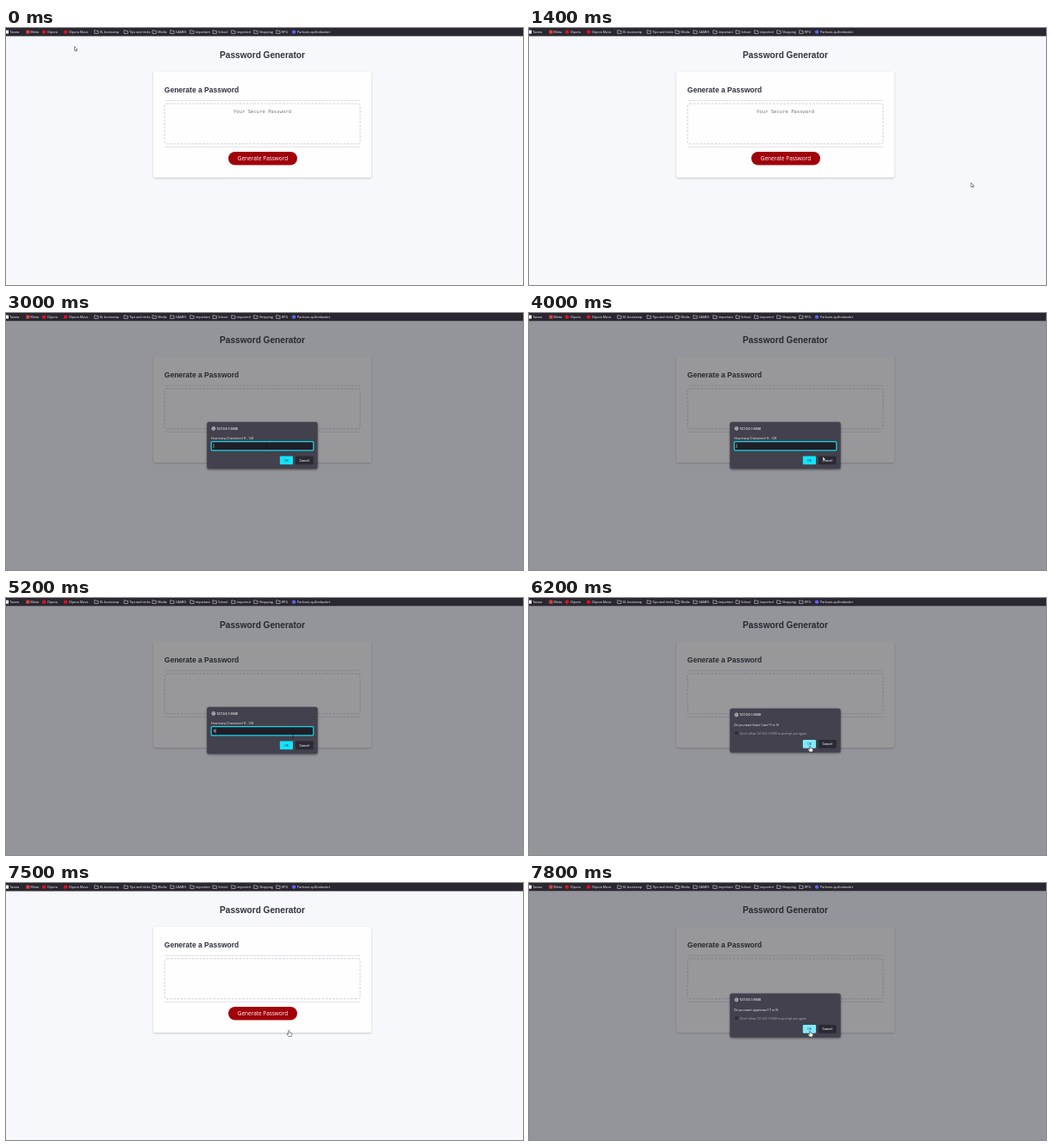
An HTML page for the animation above (8 s loop, 600 px wide and 299 px high).

```html
<!DOCTYPE html>
<html lang="en">
<head>
<meta charset="utf-8">
<title>Password Generator</title>
<style>
  html, body { margin: 0; width: 100%; height: 100%; overflow: hidden; background: #f7f8fc; }
  svg { display: block; width: 600px; height: 299px; }
  text { font-family: "Open Sans", "Noto Sans", sans-serif; font-size: 3.5px; fill: #fbfbfe; white-space: pre; }
  .head { font-family: "Liberation Sans", Arial, sans-serif; font-weight: bold; fill: #2e323c; }
  .mono { font-family: "DejaVu Sans Mono", monospace; font-size: 5.57px; fill: #777; }
  .mid { text-anchor: middle; }
  .host { font-size: 3.65px; font-weight: 600; }
  .off { display: none; }
</style>
</head>
<body>
<svg viewBox="0 0 600 299">
  <defs>
    <filter id="soft" x="-5%" y="-5%" width="110%" height="115%"><feGaussianBlur stdDeviation="1.2"/></filter>
    <g id="globe" fill="none" stroke="#e8e8ee" stroke-width=".5">
      <circle r="2"/><ellipse rx=".9" ry="2"/><path d="M-2 0H2"/>
    </g>
  </defs>

  <rect width="600" height="299" fill="#f7f8fc"/>
  <rect x="171" y="52" width="253" height="123" rx="2" fill="#0003" filter="url(#soft)"/>
  <rect x="171" y="51" width="253" height="123" rx="2" fill="#fefeff"/>
  <text class="head mid" x="297.5" y="34.6" style="font-size:10.12px">Password Generator</text>
  <text class="head" x="183.8" y="74.7" style="font-size:8.5px">Generate a Password</text>
  <path d="M184 84.4H411M184 138.4H411" stroke="#dcdce0" stroke-width=".8"/>
  <rect x="184" y="88" width="227" height="46.8" rx="2.5" fill="none" stroke="#c6c8ce" stroke-width=".9" stroke-dasharray="2.5 1.7"/>
  <text class="mono mid" id="hint" x="297.5" y="99">Your Secure Password</text>
  <rect x="258" y="144" width="80" height="15.6" rx="7.8" fill="#a0000a"/>
  <text class="mid" x="298" y="154.2" style="font-size:6.43px;fill:#fff">Generate Password</text>

  <rect id="shade" y="9.5" width="600" height="290" fill="#1c1b22" fill-opacity=".45"/>
  <rect width="600" height="9.5" fill="#2a2731"/>
  <g id="marks"></g>

  <g id="ask">
    <rect x="233" y="127.4" width="129" height="55" rx="2.5" fill="#0006" filter="url(#soft)"/>
    <rect x="233.2" y="126.7" width="128.4" height="54.6" rx="2.5" fill="#42414d"/>
    <use href="#globe" x="240.8" y="134.4"/>
    <text class="host" x="244.3" y="135.8">127.0.0.1:5500</text>
    <text x="238" y="147.2">How many Characters? 8 - 128</text>
    <rect x="238.2" y="149.6" width="118.6" height="10.2" rx="1" fill="#1f1e28" stroke="#16d6e8" stroke-width="1.2"/>
    <text id="typed" x="240.6" y="156.3" style="font-size:4px">8</text>
    <path id="caret" d="M0 152.3V157.2" stroke="#fbfbfe" stroke-width=".5"/>
  </g>

  <g id="confirm">
    <rect x="233" y="129.2" width="129" height="51.5" rx="2.5" fill="#0006" filter="url(#soft)"/>
    <rect x="233.2" y="128.5" width="128.4" height="51.2" rx="2.5" fill="#42414d"/>
    <use href="#globe" x="240.8" y="135.9"/>
    <text class="host" x="244.3" y="137.3">127.0.0.1:5500</text>
    <text id="question" x="238" y="148.7"></text>
    <rect x="238.8" y="155" width="4.2" height="4.2" rx=".7" fill="#2b2a33" stroke="#5b5a66" stroke-width=".3"/>
    <text x="245" y="158.5" style="fill:#b4b3bd">Don't allow 127.0.0.1:5500 to prompt you again</text>
  </g>

  <g id="buttons">
    <rect id="ok" x="317.8" y="166.4" width="15.2" height="9.9" rx="1.2"/>
    <text class="mid" x="325.4" y="172.7" style="fill:#2b2a33">OK</text>
    <rect x="335.8" y="166.4" width="20.8" height="9.9" rx="1.2" fill="#2b2a33"/>
    <text class="mid" x="346.2" y="172.7" style="font-weight:600">Cancel</text>
  </g>

  <g id="cursor" stroke-linejoin="round">
    <path id="arrow" d="M0 0V5L1.2 4L2 5.7L2.8 5.3L2 3.7H3.5Z" fill="#fff" stroke="#222" stroke-width=".5"/>
    <path id="beam" d="M-1-2.7H1M0-2.7V2.7M-1 2.7H1" fill="none" stroke="#111" stroke-width=".5"/>
    <path id="hand" d="M-.6 .3Q0-.5 .6 .3V2.6L3.1 3.2Q3.9 3.5 3.7 4.5L3 7H-.3L-2.3 4.4Q-2.2 3.5-1.4 3.8L-.6 4.5Z" fill="#fff" stroke="#222" stroke-width=".5"/>
  </g>
</svg>
<script>
const $ = id => document.getElementById(id);
const show = (id, on) => $(id).classList.toggle('off', !on);

// Bookmarks: [text x, label, icon colour]; folders have no colour
const marks = [
  [4.2, 'Tavora', '#fff'], [28.6, 'Minta', '#d9443a'], [48, 'Clipora', '#e3101c'],
  [73, 'Clipora Music', '#e3101c'], [109, 'KL bootcamp'], [143.3, 'Tips and tricks'],
  [176.2, 'Media'], [197, 'GAMES'], [220, 'important'], [246.3, 'School'],
  [268, 'imported'], [294, 'Shopping'], [320, 'RPG'], [338, 'Parloom-quillonbasket', '#5865f2']
];
$('marks').innerHTML = marks.map(([x, label, color], i) => {
  const icon = !color
    ? `<path d="M${x - 6.3} 6.4V2.7H${x - 4.6}L${x - 4} 3.4H${x - 1.9}V6.4Z" fill="none" stroke="#e4e4ea" stroke-width=".55"/>`
    : i < 2
      ? `<rect x="${x - 5.2}" y="2.6" width="4" height="4" fill="${color}"/>`
      : `<circle cx="${x - 3.9}" cy="4.6" r="2.2" fill="${color}"/>`;
  return icon + `<text x="${x}" y="5.9" style="font-size:3.6px">${label}</text>`;
}).join('');

// Pointer track: [ms, x, y]
const track = [
  [0, 79.5, 21.5], [100, 79.5, 21.5], [500, 230, 85], [900, 392, 151], [1400, 513, 180],
  [1900, 462, 161], [2400, 345, 155], [2700, 300, 150], [2900, 300, 150], [3000, 302.5, 154],
  [3600, 305, 155], [4100, 350, 170], [4500, 333, 160.5], [5400, 333, 160.5],
  [5800, 326, 172], [7400, 326, 172], [7500, 328.3, 171.5], [7600, 326, 172], [8000, 326, 172]
];

function pointer(t) {
  const i = track.findIndex(p => p[0] > t);
  const [t0, x0, y0] = track[i - 1], [t1, x1, y1] = track[i];
  const k = (t - t0) / (t1 - t0);
  return [x0 + (x1 - x0) * k, y0 + (y1 - y0) * k];
}

function draw(t) {
  const [x, y] = pointer(t);
  const inside = (l, top, r, b) => x >= l && x <= r && y >= top && y <= b;
  const closed = t < 3000 || (t >= 7500 && t < 7600);
  const ask = !closed && t < 5900;
  const typed = t >= 4800;
  const overOk = !closed && inside(318, 166, 333, 176);

  show('hint', t < 2800);
  show('shade', !closed);
  show('ask', ask);
  show('confirm', !closed && !ask);
  show('buttons', !closed);
  show('typed', typed);
  show('caret', t % 1000 < 500);
  $('caret').setAttribute('transform', `translate(${typed ? 243.2 : 241} 0)`);
  $('question').textContent = `Do you want ${t < 7500 ? 'lower Case' : 'uppercase'}? Y or N`;
  $('buttons').setAttribute('transform', `translate(0 ${ask ? 0 : -1.5})`);
  $('ok').setAttribute('fill', overOk ? '#80ebff' : '#12e4fa');

  const beam = closed ? inside(184, 88, 411, 135) : ask && inside(238, 149, 357, 161);
  const hand = overOk || t >= 7500 || (closed && inside(258, 144, 338, 160));
  show('beam', beam && !hand);
  show('hand', hand);
  show('arrow', !beam && !hand);
  $('cursor').setAttribute('transform', `translate(${x} ${y})`);
}

const start = performance.now();
function tick() {
  const t = (performance.now() - start) % 8000;
  draw(Math.floor(t / 100) * 100);
  requestAnimationFrame(tick);
}
tick();
</script>
</body>
</html>
```
